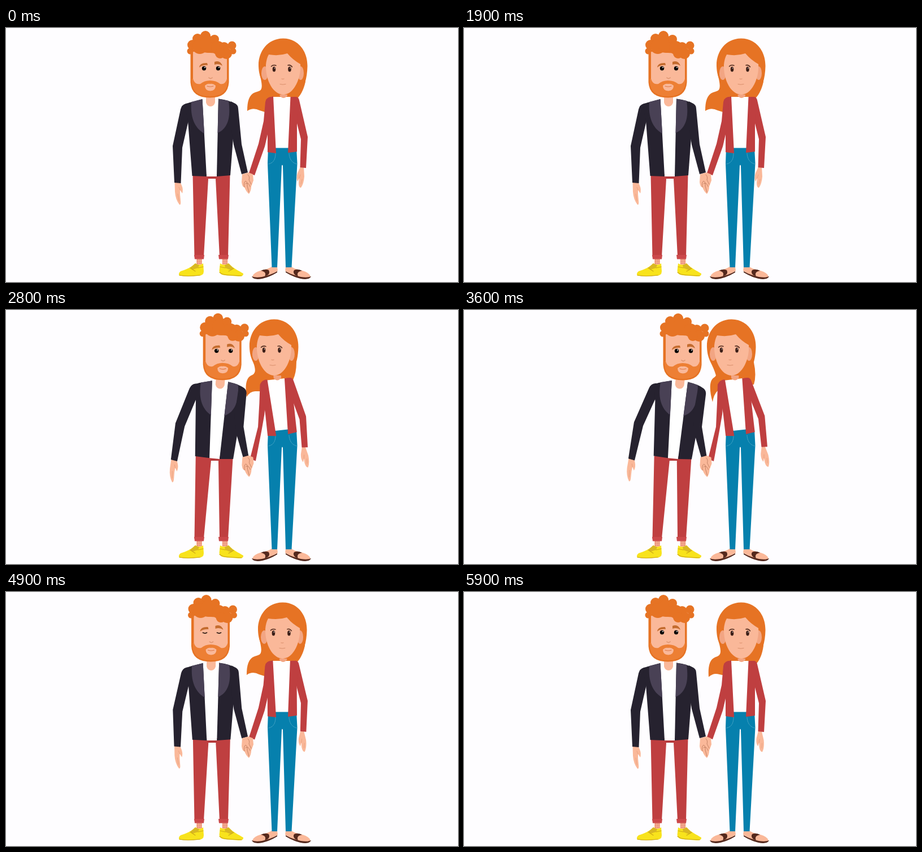
Write an HTML page that moves like this. It is 800 by 450 pixels and loops after 6 s.

```html
<!DOCTYPE html>
<html lang="en">
<head>
<meta charset="utf-8">
<title>Couple holding hands</title>
<style>
html, body { margin: 0; width: 100%; height: 100%; overflow: hidden; background: #fefdff; }
svg { display: block; width: 100%; height: 100%; }
.line { fill: none; stroke-linecap: round; stroke-linejoin: round; }
.skin { fill: #fab899; }
.shade { fill: #f2a583; }
.hair { fill: #e67324; }
.beard { fill: #ed7f34; }
.dark { fill: #26222f; }
.lapel { fill: #494155; }
.red { fill: #bf3f40; }
.blue { fill: #0680ad; }
.white { fill: #fff; }
.yellow { fill: #f8e31c; }
.tongue { fill: #d9b822; }
.sandal { fill: #55291d; }
</style>
</head>
<body>
<svg viewBox="0 0 800 450">
  <defs>
    <g id="foot">
      <path class="skin" d="M470 423H480L481 430Q471 437 456 441Q441 445 436 440Q439 433 450 430Q464 427 470 423Z"/>
      <path class="sandal" d="M435 440Q441 443 453 441Q470 437 480 431V433Q467 441 454 444Q438 447 435 440Z"/>
      <path class="sandal" d="M451 430Q459 426 465 429Q468 434 463 438L458 440Q462 432 451 430Z"/>
    </g>
  </defs>

  <!-- Woman -->
  <path id="wTail" class="hair"/>
  <use href="#foot"/>
  <use href="#foot" transform="translate(975 0) scale(-1 1)"/>
  <path class="blue" d="M464 211H514L515.500 240L505.500 424H495L490 244Q489 241 488 244L480 424H470.500L463 240Z"/>
  <path class="line" stroke="#55abc9" stroke-width=".8" stroke-dasharray="2 1" d="M477 222Q477 239 464 241M501 222Q502 238 515 241"/>
  <g id="wBody">
    <g id="wArm">
      <g id="wHand">
        <path class="skin" d="M521 246L516 257Q513 266 516 272L519 266L518 274Q518 283 522 283Q527 276 528 263L527 246Z"/>
        <path class="line" stroke="#e39b78" stroke-width=".7" d="M519 266L521 260M522 276L524 268"/>
      </g>
      <path class="red" d="M506 122L514 122Q518 123 519 128L534 193L531 248L520.500 247L522 197L514 165Z"/>
    </g>
    <path class="white" d="M472 122H506L500 212.500H477Z"/>
    <path class="shade" d="M484.500 112H498V120Q491 128 484.500 120Z"/>
    <path class="red" d="M473 121L466 123L460 127L463 180V220L478 222Z"/>
    <path class="red" d="M503.500 122L514 122L518 126L515 165V219L499 221Z"/>
  </g>
  <path id="wHold" class="red"/>
  <g id="wHead">
    <path class="hair" d="M490 18.500C462 19 446 43 447 68C448 92 457 96 463 118H516C528 108 533 89 533.500 68C534 40 516 18 490 18.500Z"/>
    <ellipse class="shade" cx="458" cy="80" rx="6" ry="12"/>
    <ellipse class="shade" cx="521.500" cy="80" rx="5.500" ry="12"/>
    <path class="skin" d="M465 47Q483 50 498 45Q508 57 521 64C523 87 510 118 491 118C472 118 459 91 460 65Q461 54 465 47Z"/>
    <g id="wFace">
      <g fill="#3c1f18">
        <ellipse cx="474.500" cy="73" rx="2.800" ry="4.600"/>
        <ellipse cx="502" cy="73" rx="2.800" ry="4.600"/>
      </g>
      <circle class="white" cx="475.500" cy="71" r=".8"/>
      <circle class="white" cx="503" cy="71" r=".8"/>
      <path class="line" stroke="#512a1d" stroke-width="1.500" d="M469.500 68Q473 64.500 478 66.500M499 66Q503 64.500 506.500 69"/>
      <path class="line" stroke="#e39a78" stroke-width="1.300" d="M488 90Q490 91 492 90"/>
      <path class="line" stroke="#d98f6c" stroke-width="1" d="M485 99.500Q490 101 495 99.500"/>
    </g>
  </g>

  <!-- Man -->
  <g id="mLegs">
    <path class="red" d="M330.500 259H396.500L393 405H378L371 267H358L350 405H333.500Z"/>
    <path fill="#b53a3c" d="M357 262H373L371 267H358Z"/>
  </g>
  <g id="socks"></g>
  <path fill="#cb484a" d="M333 402H351L350 409.500H334ZM376 402H394L393 409.500H377Z"/>
  <path class="yellow" d="M335 417C328 424 319 428 309 431Q304 435 307 439H340Q350 439 350 431L349 417Q342 422 335 417Z"/>
  <path class="yellow" d="M379 417L377.500 430Q378 437 387 438L412 440Q421 440 420 435C412 430 402 426 394 417Q386 422 379 417Z"/>
  <path class="tongue" d="M335 417L326 425L330 428L340 425L342 420ZM394 417L403 426L398 429L388 425L387 420Z"/>
  <g class="line" stroke="#cda914" stroke-width="1.200">
    <path d="M307 438Q320 441 343 438M378 433Q384 438 397 438L417 439"/>
    <path d="M326 425L335 431M340 425L349 423M379 423L388 425M394 431L403 426"/>
  </g>
  <g id="mBody">
    <g id="mArm">
      <path class="skin" d="M298.500 272L299 290Q300 304 307 313Q310 314 309 306L308 295L308 287L312 293Q314 286 311 279L308 272Z"/>
      <path class="line" stroke="#e39b78" stroke-width=".7" d="M304 294L306 306M308 287L306 282"/>
      <path class="dark" d="M331 131L318 134Q311 136 309 144L295 209L298 274L309.500 275L312 212L323 164Z"/>
    </g>
    <path class="white" d="M346 126H377L373 263H355Z"/>
    <path class="skin" d="M354 117H370V132Q368 139 362 139Q356 139 354 132Z"/>
    <path class="dark" d="M347.500 126L329 131Q319 133 317 139L322 165L329.500 262L355 263Z"/>
    <path class="dark" d="M376 125.500Q397 128 406 135L402 195L397 261L373 263Z"/>
    <path class="lapel" d="M347.500 126L328 131C326 157 333 177 351 187Z"/>
    <path class="lapel" d="M376 125.500L394 129C398 158 393 178 374.500 186Z"/>
  </g>
  <path id="mHold" class="dark"/>
  <g id="mHead">
    <path class="hair" d="M326.500 38V96Q328 123.500 361 123.500Q393 123.500 394.500 96V42Z"/>
    <path class="beard" d="M329 90V97Q331 121 361 121Q390 121 392 97V90Z"/>
    <path class="skin" d="M331 42V90Q334 101 344 99Q351 93 361 93Q372 93 379 99Q388 101 391 90V46Z"/>
    <path class="skin" d="M352 102Q357 97.500 361 99Q366 97.500 371 102Q371 111 361.500 111.500Q352 111 352 102Z"/>
    <path class="line" stroke="#dd7545" stroke-width="1.100" d="M356 103Q361 105 367 103"/>
    <path class="line" stroke="#df9774" stroke-width="1.700" d="M359 88Q362 91 365 88"/>
    <path fill="#c46c2f" d="M342 70Q343 61 356 62L357 66Q348 65 342 70ZM369 60Q379 56 383 67Q377 62 369 65Z"/>
    <g id="mEyes">
      <circle cx="350.500" cy="71.500" r="3.700"/><circle cx="375.500" cy="71.500" r="3.700"/>
      <circle class="white" cx="352" cy="70" r="1"/><circle class="white" cx="377" cy="70" r="1"/>
    </g>
    <path id="mLids" class="line" stroke="#24150f" stroke-width="1.700" d="M347 72Q351 74 354 72M372 72Q376 74 379 72"/>
    <g id="curls" class="hair"></g>
  </g>

  <!-- Joined hands -->
  <g id="hands">
    <path class="skin" d="M418 259L417 273Q418 282 422 282Q425 290 430 294Q434 288 434 281L438 270L437 259L429 256Z"/>
    <path class="line" stroke="#b9775a" stroke-width=".8" d="M428 260Q432 263 430 269L434 277M422 282Q420 274 424 271Q428 273 427 280L430 291M424 276Q429 272 432 281"/>
  </g>
</svg>
<script>
const LOOP = 6000, STEP = 100;
const $ = id => document.getElementById(id);
const clamp = x => Math.max(0, Math.min(1, x));
const ease = (t, a, b) => (1 - Math.cos(Math.PI * clamp((t - a) / (b - a)))) / 2;
const move = (id, value) => $(id).setAttribute('transform', value);

// Piecewise motion from [time, value] stops
function track(t, stops) {
  for (let i = 1; i < stops.length; i++) {
    const [t0, a] = stops[i - 1], [t1, b] = stops[i];
    if (t <= t1) return a + (b - a) * ease(t, t0, t1);
  }
  return stops[stops.length - 1][1];
}

// Path whose numbers blend between two poses
function blend(id, from, to, k) {
  const end = to.match(/[\d.]+/g).map(Number);
  let i = 0;
  $(id).setAttribute('d', from.replace(/[\d.]+/g, n => (+n + (end[i++] - n) * k).toFixed(2)));
}

const curls = [
  [353, 14, 9], [339, 19, 9], [330, 30, 9], [326, 41, 5.500], [343, 33, 13], [358, 29, 15],
  [369, 20, 8], [375, 35, 12], [386, 34, 9], [390, 45, 10], [400, 31, 7.500], [402, 41, 5.500], [379, 45, 9]
];
$('curls').innerHTML = curls.map(([x, y, r]) => `<circle cx="${x}" cy="${y}" r="${r}"/>`).join('');

const sock = x => {
  let s = `<path class="skin" d="M${x} 407h10v13h-10z"/>`;
  for (let i = 0; i < 9; i++)
    s += `<circle cx="${x + 2 + i % 3 * 3}" cy="${411 + Math.floor(i / 3) * 3}" r=".8" fill="#c94a45"/>`;
  return s;
};
$('socks').innerHTML = sock(337) + sock(382.500);

const swayHim = [[0, 0], [2050, 0], [3050, 1], [4350, 1], [5000, 0]];
const swayHer = [[0, 0], [1950, 0], [2950, 1], [4350, 1], [5000, 0]];
const tail = [[0, 0], [950, .1], [1900, 0], [2400, 0], [3200, 1], [4350, 1], [4900, 0], [5500, .2], [6000, .2]];
const arm = [[0, 0], [1950, 0], [2500, 1.2], [3100, -1.5], [4350, -1.5], [5000, 0]];
const wrist = [[0, 0], [950, -3], [1900, 0], [2500, 1], [3000, -15], [3600, -10], [6000, -10]];

function draw(t) {
  const m = track(t, swayHim), w = track(t, swayHer), h = track(t, tail);

  move('mLegs', `translate(0 405) matrix(1 0 ${-.042 * m} 1 0 0) translate(0 -405)`);
  move('mBody', `translate(${6 * m} 0) rotate(${6 * m} 363 262)`);
  move('mArm', `rotate(${5.500 * m} 320 142)`);
  move('mHead', `translate(${26 * m} ${m})`);
  blend('mHold',
    'M398 130L406 134Q411 137 411 143L417 206L428 256L417 259L403 207L399 180Z',
    'M415 134L424 139Q429 143 428 150L421 207L430 262L421 265L409 223L405 190Z', m);

  move('wBody', `rotate(${-6.500 * w} 490 220)`);
  move('wArm', `rotate(${track(t, arm)} 513 128)`);
  move('wHand', `rotate(${track(t, wrist)} 526 248)`);
  move('wHead', `translate(${-17 * w} ${-2 * w})`);
  move('wFace', `translate(${-2 * w} 0)`);
  move('wTail', `translate(${-17 * w} ${-2 * w})`);
  blend('wTail',
    'M449 82C457 112 451 111 441 114C430 118 427 130 427 147Q437 140 449 146L468 152L512 128Q525 118 530 95L520 60Z',
    'M449 82C459 98 470 116 459 122C451 127 451 145 457 165Q459 152 465 146L472 140L530 134Q535 118 530 95L520 60Z', h);
  blend('wHold',
    'M470 122Q461 122 459 131L456 165L447 205L430 257L440 261L458 210L465 180Z',
    'M461 123Q452 124 449 132L448 165L446 207L432 264L442 268L452 214L457 185Z', w);
  move('hands', `translate(${.5 * m} ${2 * m})`);

  const shut = t >= 4900 && t < 5000;
  const half = !shut && t >= 4800 && t < 5100;
  $('mEyes').style.display = shut ? 'none' : '';
  $('mLids').style.display = shut ? '' : 'none';
  move('mEyes', half ? 'translate(0 36) scale(1 .5)' : '');
}

function tick() {
  const t = performance.now() % LOOP;
  draw(Math.floor(t / STEP) * STEP);
  requestAnimationFrame(tick);
}
tick();
</script>
</body>
</html>
```
